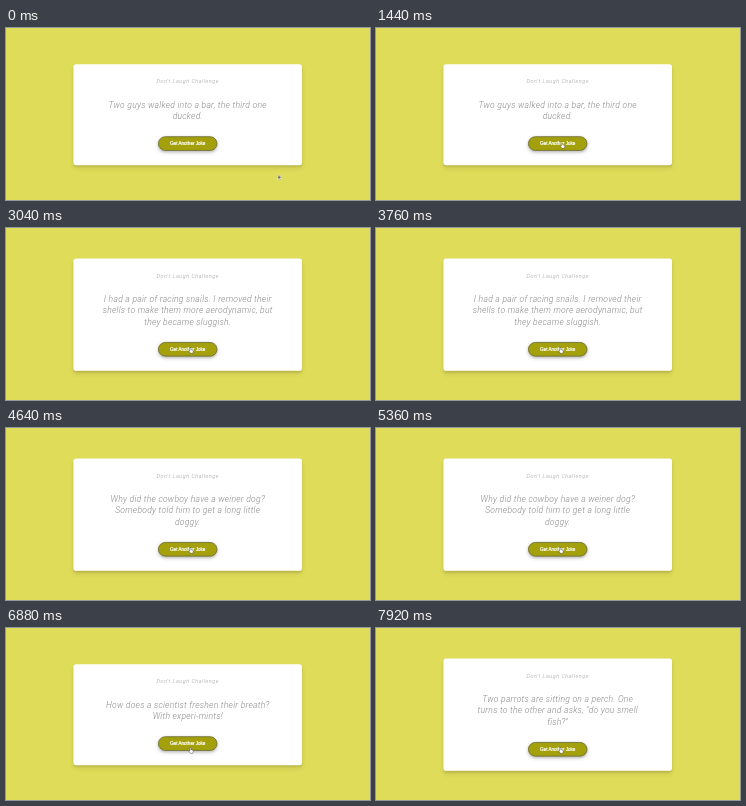
These frames come from a looping animation (364x172 px, 8000 ms). An HTML page:

```html
<!DOCTYPE html>
<html lang="en">
<head>
<meta charset="utf-8">
<title>Don't Laugh Challenge</title>
<style>
  html, body { margin: 0; width: 100%; height: 100%; overflow: hidden; background: #dfdc59; }
  #page {
    position: absolute; left: 0; top: 0; width: 1274px; height: 602px;
    transform: scale(calc(2 / 7)); transform-origin: 0 0;
    display: flex; align-items: center; justify-content: center;
    font: italic 300 16px Roboto, sans-serif;
  }
  .card {
    position: relative; top: 2px; left: -1px;
    box-sizing: border-box; width: 800px; padding: 50px 20px;
    background: #fff; border-radius: 10px; text-align: center;
    box-shadow: 0 10px 20px rgba(0, 0, 0, .1), 0 6px 6px rgba(0, 0, 0, .1);
  }
  h3 { margin: 0; font-size: 18.72px; line-height: 22px; font-weight: 300; letter-spacing: 2px; color: #999; }
  #joke { margin: 50px 0; font-size: 30px; line-height: 40px; letter-spacing: .9px; white-space: pre; color: #888; }
  button {
    display: block; margin: 0 auto; padding: 14px 40px;
    font: 16px/19px "Liberation Sans", Arial, sans-serif; color: #fff; -webkit-text-stroke: .8px #fff;
    background: #a3a00c; border: 3px solid #6d6b35; border-radius: 26px;
    box-shadow: 0 5px 15px rgba(0, 0, 0, .2), 0 6px 6px rgba(0, 0, 0, .1);
    box-sizing: border-box; width: 208px; height: 51px; padding: 0;
  }
  svg { position: absolute; left: 0; top: 0; overflow: visible; }
</style>
</head>
<body>
<div id="page">
  <div class="card">
    <h3>Don't Laugh Challenge</h3>
    <div id="joke"></div>
    <button>Get Another Joke</button>
  </div>
  <svg id="cursor" width="20" height="22" stroke-width="1.5" stroke-linejoin="round">
    <path id="arrow" fill="#666" stroke="#fff" d="M3 1V18L7 14L10 21L13 19L10 13H16Z"/>
    <path id="hand" fill="#fff" stroke="#333" d="M6 12V3Q8 0 10 3V8L17 10Q19 11 18 15L16 21H8L2 13Q3 10 6 12Z"/>
  </svg>
</div>
<script>
const LOOP = 8000, TICK = 80;
const $ = id => document.getElementById(id);

const jokes = [
  [0, "Two guys walked into a bar, the third one\nducked."],
  [1680, "I had a pair of racing snails. I removed their\nshells to make them more aerodynamic, but\nthey became sluggish."],
  [4480, "Why did the cowboy have a weiner dog?\nSomebody told him to get a long little\ndoggy."],
  [6240, "How does a scientist freshen their breath?\nWith experi-mints!"],
  [7360, "Two parrots are sitting on a perch. One\nturns to the other and asks, \"do you smell\nfish?\""],
];

// Cursor centre in stage pixels: [time, x, y]
const path = [[0, 274, 149.5], [160, 186.5, 117.5], [2720, 186.5, 117.5], [3040, 185, 122.5], [LOOP, 185, 122.5]];

function cursorAt(t) {
  const i = path.findIndex(p => p[0] > t);
  const [t0, x0, y0] = path[i - 1], [t1, x1, y1] = path[i];
  const k = (t - t0) / (t1 - t0);
  return [x0 + (x1 - x0) * k, y0 + (y1 - y0) * k];
}

function draw(now) {
  const t = Math.floor(now % LOOP / TICK) * TICK;
  const text = jokes.findLast(([start]) => start <= t)[1];
  if ($("joke").textContent !== text) $("joke").textContent = text;

  const [x, y] = cursorAt(t);
  $("cursor").style.transform = `translate(${x * 3.5 - 10}px, ${y * 3.5 - 11}px)`;
  const onButton = t >= 160;
  $("arrow").style.display = onButton ? "none" : "";
  $("hand").style.display = onButton ? "" : "none";
  requestAnimationFrame(() => draw(performance.now()));
}
draw(0);
</script>
</body>
</html>
```
